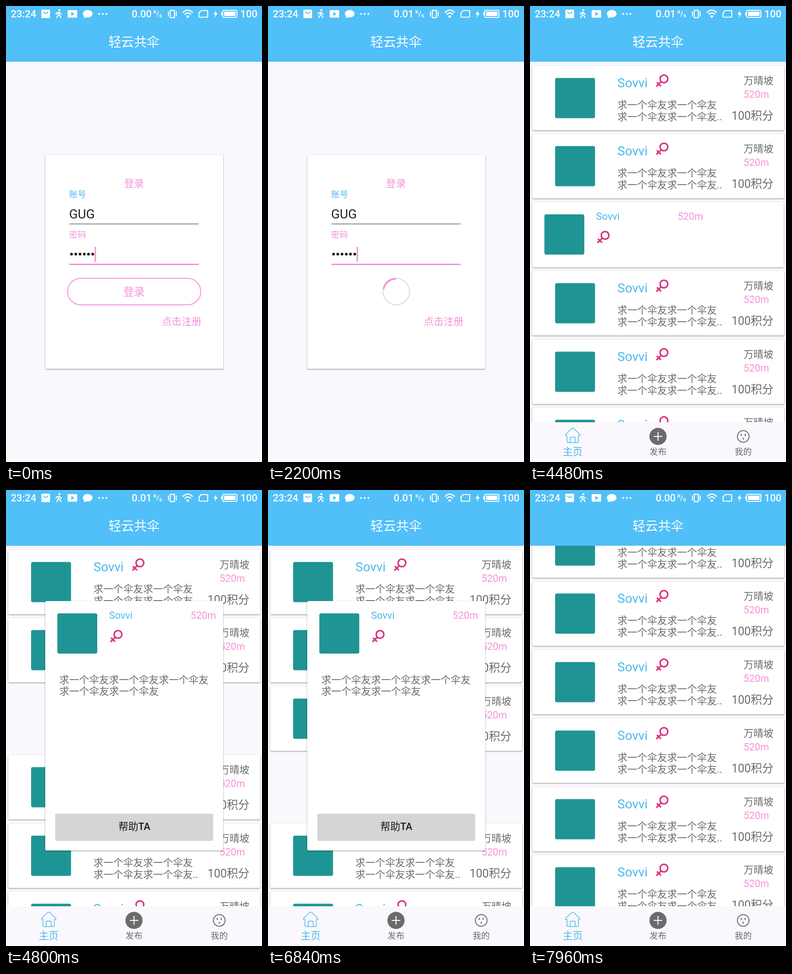
Animation, 561 px wide and 998 px high, one loop 8 s. Source, as an HTML page:

```html
<!DOCTYPE html>
<html lang="zh-CN">
<head>
<meta charset="utf-8">
<title>轻云共伞</title>
<style>
:root { --blue: #51bff8; --pink: #f792d9; --grey: #6b6b6d; --bg: #faf8fc; }
html, body { margin: 0; width: 100%; height: 100%; overflow: hidden; background: var(--bg); }
body { position: relative; font-family: Roboto, "Noto Sans CJK SC", "Noto Sans CJK", sans-serif; }
div, svg { position: absolute; }
svg { left: 0; top: 0; overflow: visible; }
text { white-space: pre; }
.track { left: 0; top: 0; width: 1122px; height: 998px; animation: slide 8s infinite; }
.page { top: 0; width: 561px; height: 998px; overflow: hidden; background: var(--bg); }
.login { left: 0; animation: tint 8s step-end infinite; }
.home { left: 561px; }
.head { left: 0; top: 0; width: 1122px; height: 121.5px; background: var(--blue); }
.card { background: #fff; border-radius: 3px; box-shadow: 0 1.3px 3px rgba(0,0,0,.4), 0 0 1px rgba(0,0,0,.2); }
.list { left: 0; top: 0; animation: scroll 8s linear infinite; }
.list .card { left: 4.5px; width: 552px; height: 141px; }
.list .card:nth-child(3) { animation: gone1 8s step-end infinite; }
.list .card:nth-child(4) { animation: gone2 8s step-end infinite; }
.box { left: 85.5px; top: 326px; width: 390px; height: 468px; border-radius: 2px; }
.btn { left: 133.5px; top: 595px; width: 294px; height: 60px; box-sizing: border-box; border: 2.6px solid var(--pink); border-radius: 30px; background: #fff; animation: morph 8s infinite; }
.dialog { overflow: hidden; visibility: hidden; animation: grow 8s infinite, open 8s step-end infinite; }
.label { animation: label 8s step-end infinite; }
.caret { animation: blink 8s step-end infinite; }
.arc { transform-origin: 280.5px 625px; animation: spin 8s linear infinite, ring 8s step-end infinite; }
.idle { animation: idle 8s step-end infinite; }
.busy { animation: busy 8s step-end infinite; }
.b { fill: #4bb9ee; } .p { fill: var(--pink); } .g { fill: var(--grey); } .w { fill: #fff; }
.s12 { font-size: 18.7px; } .s14 { font-size: 21.82px; } .s16 { font-size: 24.93px; } .s18 { font-size: 28.05px; }
.end { text-anchor: end; } .mid { text-anchor: middle; }

@keyframes tint { 0% { background: #f7f9fd; } 15%, 100% { background: #faf8fc; } }
@keyframes blink {
  0%, 9%, 21.5%, 34% { visibility: visible; }
  3%, 15%, 27.75%, 40%, 100% { visibility: hidden; }
}
@keyframes label { 0% { visibility: visible; } 16.25%, 100% { visibility: hidden; } }
@keyframes morph {
  0%, 16.25% { left: 133.5px; width: 294px; border-color: #f792d9; background: #fff; animation-timing-function: cubic-bezier(.37,0,.63,1); }
  21.25%, 27.625% { left: 250.5px; width: 60px; border-color: #dadadf; background: #fff; animation-timing-function: cubic-bezier(.37,0,.63,1); }
  31.625%, 100% { left: 133.5px; width: 294px; border-color: #10b598; background: #10b598; }
}
@keyframes ring { 0%, 27.625%, 100% { visibility: hidden; } 21.25% { visibility: visible; } }
@keyframes spin {
  0%, 21.25% { transform: rotate(-150deg); stroke-dasharray: 330 360; }
  27.5%, 100% { transform: rotate(192deg); stroke-dasharray: 78 360; }
}
@keyframes slide {
  0%, 41.57% { transform: none; animation-timing-function: cubic-bezier(.333,.667,.667,1); }
  44.5%, 100% { transform: translateX(-561px); }
}
@keyframes grow {
  0%, 55.8% { left: 4.5px; top: 430px; width: 552px; height: 141px; transform: none; animation-timing-function: cubic-bezier(.4,0,.2,1); }
  60%, 71.25% { left: 85.5px; top: 243px; width: 390px; height: 546px; transform: none; animation-timing-function: linear; }
  72% { left: 85.5px; top: 243px; width: 390px; height: 546px; transform: translateX(480px); }
  82.6%, 82.625% { left: 4.5px; top: 580px; width: 552px; height: 141px; transform: none; animation-timing-function: cubic-bezier(.4,0,.2,1); }
  85.5%, 93.75% { left: 85.5px; top: 243px; width: 390px; height: 546px; transform: none; animation-timing-function: linear; }
  95.5%, 100% { left: 85.5px; top: 243px; width: 390px; height: 546px; transform: translateX(480px); }
}
@keyframes open {
  0%, 72%, 95.5%, 100% { visibility: hidden; }
  55.8%, 82.625% { visibility: visible; }
}
@keyframes gone1 { 0%, 71.25%, 100% { visibility: visible; } 55.8% { visibility: hidden; } }
@keyframes gone2 { 0%, 93.75%, 100% { visibility: visible; } 82.625% { visibility: hidden; } }
@keyframes scroll { 0%, 98.75% { transform: none; } 99.5%, 100% { transform: translateY(-80px); } }
@keyframes idle { 0%, 91%, 100% { visibility: visible; } 20% { visibility: hidden; } }
@keyframes busy { 0%, 91%, 100% { visibility: hidden; } 20% { visibility: visible; } }
</style>
</head>
<body>
<svg width="0" height="0">
  <defs>
    <g id="sex" fill="none" stroke="#dc3380" stroke-width="3.4">
      <circle cx="293" cy="159" r="8.4"/>
      <path d="M287 165L276.5 175.5M277.5 166.5L286.5 175"/>
    </g>
    <text id="name" class="w mid s18" x="280.5" y="88.5">轻云共伞</text>
    <g id="item">
      <rect x="54.5" y="157" width="87.5" height="88" rx="4" fill="#1f9495"/>
      <text class="b s18" x="191" y="177">Sovvi</text>
      <use href="#sex"/>
      <g class="g s14">
        <text x="191" y="223.7">求一个伞友求一个伞友</text>
        <text x="191" y="249.3">求一个伞友求一个伞友..</text>
        <text x="467.4" y="170">万晴坡</text>
        <text class="p" x="467.4" y="200">520m</text>
        <text class="end s16" x="533" y="248.5">100积分</text>
      </g>
    </g>
  </defs>
</svg>

<div class="track">
  <div class="page login">
    <div class="card box"></div>
    <div class="btn"></div>
    <svg width="561" height="998">
      <text class="p mid s14" x="280.5" y="396">登录</text>
      <text class="b s12" x="138.3" y="419.3">账号</text>
      <text class="s18" x="138.2" y="465.3" fill="#212121">GUG</text>
      <path d="M139 477H422" stroke="#6e6e70" stroke-width="1.3"/>
      <text class="p s12" x="138.3" y="507">密码</text>
      <path d="M143.6 543H191" stroke="#212121" stroke-width="6.2" stroke-linecap="round" stroke-dasharray="0 9.3"/>
      <rect class="p caret" x="194.3" y="527" width="3" height="33"/>
      <rect class="p" x="139" y="564" width="283.5" height="3"/>
      <text class="p mid label" x="280.5" y="634" font-size="23.38">登录</text>
      <circle class="arc" cx="280.5" cy="625" r="28" pathLength="360" fill="none" stroke="#f792d9" stroke-width="4"/>
      <text class="p s14" x="341.3" y="698">点击注册</text>
    </svg>
  </div>

  <div class="page home">
    <div class="list"></div>
    <svg width="561" height="998">
      <rect y="911" width="561" height="87" fill="#faf8fc"/>
      <g fill="none" stroke="#4bb9ee" stroke-width="1.5" stroke-linejoin="round" stroke-linecap="round">
        <path d="M81 940H78.5Q76.5 939.5 78 937.5L91.5 924.5Q93.5 923 95.5 924.5L109 937.5Q110.5 939.5 108.5 940H106V952.5Q106 955.5 103 955.5H84Q81 955.5 81 952.5Z"/>
        <path d="M88 955V946Q88 943.5 90.5 943.5H96.5Q99 943.5 99 946V955"/>
      </g>
      <text class="b mid s14" x="93.5" y="982.6">主页</text>
      <circle class="g" cx="280.5" cy="942" r="18.8"/>
      <path d="M271 942H290M280.5 932.5V951.5" stroke="#fff" stroke-width="2.2"/>
      <circle cx="467.3" cy="942" r="12.8" fill="none" stroke="#6b6b6d" stroke-width="2"/>
      <path d="M463 937.5V940M471.6 937.5V940M467.3 946V948" stroke="#6b6b6d" stroke-width="2.4" stroke-linecap="round"/>
      <g class="g mid s12">
        <text x="280.5" y="982">发布</text>
        <text x="467.3" y="982">我的</text>
      </g>
    </svg>
  </div>

  <!-- one header across both pages, so no seam shows while sliding -->
  <div class="head"></div>
  <svg width="1122" height="122">
    <use href="#name"/>
    <use href="#name" x="561"/>
  </svg>
</div>

<div class="card dialog">
  <svg width="390" height="546" viewBox="85.5 243 390 546">
    <rect x="112" y="270" width="87.5" height="88" rx="4" fill="#1f9495"/>
    <use href="#sex" x="-48" y="157"/>
    <g class="g s14">
      <text class="b" x="225.2" y="282.3">Sovvi</text>
      <text class="p end" x="460" y="282.3">520m</text>
      <text x="116.3" y="422.5">求一个伞友求一个伞友求一个伞友</text>
      <text x="116.3" y="448">求一个伞友求一个伞友</text>
    </g>
    <rect x="107.5" y="710" width="346" height="58" rx="3" fill="#000" opacity=".16"/>
    <rect x="107.5" y="708.5" width="346" height="57.5" rx="2" fill="#d6d4d6"/>
    <text class="mid s14" x="280.7" y="744.3" font-weight="500" fill="#1b1b1b">帮助TA</text>
  </svg>
</div>

<svg width="561" height="34" fill="#fff">
  <g font-size="22" font-weight="500">
    <text x="10.5" y="25">23:24</text>
    <text class="idle" x="275.5" y="25">0.00</text>
    <text class="busy" x="275.5" y="25">0.01</text>
    <text x="513.5" y="25">100</text>
    <text x="323" y="17" font-size="11.5">K</text>
    <text x="329.5" y="23" font-size="16">/</text>
    <text x="335.5" y="25" font-size="13">s</text>
  </g>
  <rect x="77.5" y="8" width="19" height="18.5" rx="1.5"/>
  <path d="M82 12.5Q87 20.5 92 12.5" fill="none" stroke="#51bff8" stroke-width="2"/>
  <circle cx="117" cy="9" r="2.3"/>
  <path d="M115.5 13L114.5 20L110.5 26.5M115 19.5L119 22L120.5 26.5M115 13.5L110.5 15.5L109.5 19M116.5 13.5L119 17L122.5 18" fill="none" stroke="#fff" stroke-width="2.3"/>
  <rect x="135" y="9" width="21" height="16.5" rx="1.5"/>
  <path d="M143 13V21.5L150 17.2Z" fill="#51bff8"/>
  <ellipse cx="179" cy="17" rx="10.7" ry="8.3"/>
  <path d="M171 21L170.5 26.5L178 24.5Z"/>
  <circle cx="204" cy="17.3" r="2.1"/><circle cx="212" cy="17.3" r="2.1"/><circle cx="220" cy="17.3" r="2.1"/>
  <g fill="none" stroke="#fff" stroke-width="2.2">
    <rect x="360" y="9.5" width="9" height="16"/>
    <path d="M356 12V23M373 12V23"/>
    <path d="M387.5 14.5Q398.3 3.5 409 14.5M391.3 18.7Q398.3 11.6 405.3 18.7" stroke-width="2.6"/>
    <path d="M428 10H441Q442 10 442 11V23.5Q442 24.5 441 24.5H424Q423 24.5 423 23.5V15Z"/>
    <rect x="475" y="9.5" width="31" height="15.5" rx="2.5" stroke-width="2"/>
  </g>
  <path d="M394.3 22.3Q398.3 18.6 402.3 22.3L398.3 26.8Z"/>
  <path d="M460.5 9.5L454.5 18.5H458.5L457.5 25.5L464 15.5H460Z"/>
  <rect x="478" y="12.5" width="25" height="9.5" rx="1"/>
  <rect x="471.5" y="14" width="2.5" height="6.5"/>
</svg>

<script>
const pitch = 149.75;
document.querySelector('.list').innerHTML = Array.from({ length: 6 }, (_, i) =>
  `<div class="card" style="top:${130.5 + i * pitch}px">
    <svg width="552" height="141" viewBox="4.5 130.5 552 141"><use href="#item"/></svg>
  </div>`).join('');
</script>
</body>
</html>
```
